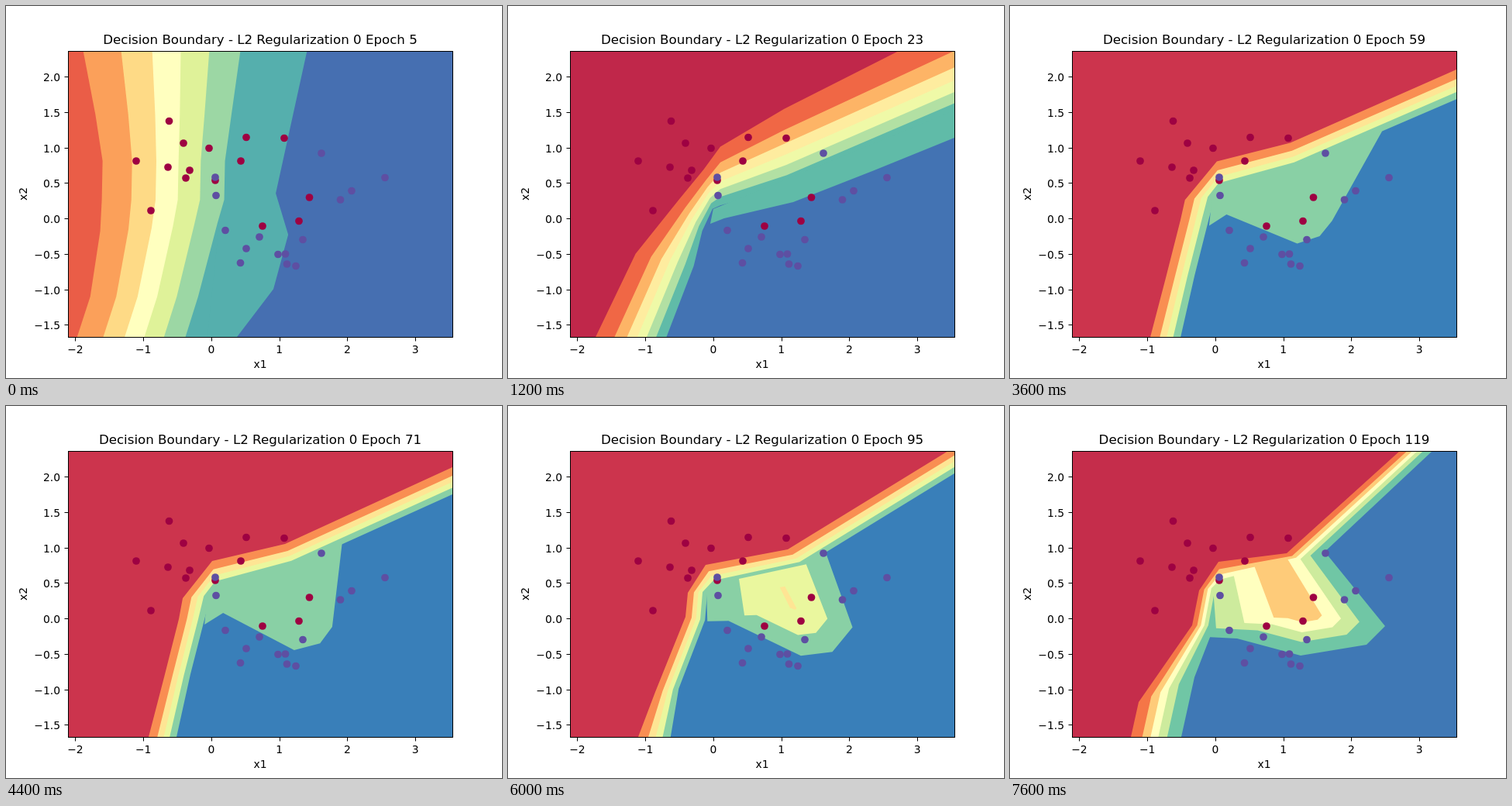
Write an HTML page with a canvas that moves like this. It is 640 px wide and 480 px high and loops after 8000 ms.

```html
<!DOCTYPE html>
<html lang="en">
<head>
<meta charset="utf-8">
<title>Decision Boundary</title>
<style>
html, body { margin: 0; width: 100%; height: 100%; overflow: hidden; background: #fff; }
canvas { display: block; }
</style>
</head>
<body>
<canvas id="plot" width="640" height="480"></canvas>
<script>
const ctx = document.getElementById('plot').getContext('2d');
const STEP = 400, STEPS = 20;
const L = 80, T = 58, R = 576, B = 427;
const mix = (a, b, t) => a + (b - a) * t;
const mixLine = (a, b, t) => a.map((p, i) => [mix(p[0], b[i][0], t), mix(p[1], b[i][1], t)]);
const parse = s => s.split(' ').map(p => p.split(',').map(Number));
const logit = p => Math.log(p / (1 - p));
const LOW = logit(.15), HIGH = logit(.9);

// The model is a slope (contours at LOW and HIGH, evenly spaced in logits between them)
// joined with a hollow that starts at probability `from` on a short spine and is full size at HIGH.
const key = (at, ease, from, low, high, hollow, spine) =>
  ({ at, ease, from: logit(from), parts: [low, high, hollow, spine].map(parse) });
const keys = [
  key(0, 1, .7,
    '70,427 87,375 98,292 99,250 100,200 88,140 68,58',
    '316,427 332,375 364,275 377,250 378,200 397,140 425,58',
    '270,-50 190,554 264,556 360,430 398,290 366,184 450,-50',
    '330,150 330,300'),
  key(3, .7, .6,
    '127,427 176,322 225,256 254,219 274,193 357,148 545,58',
    '245,427 273,342 264,308 269,284 274,291 362,277 892,58',
    '88,349 77,376 128,356 383,296 680,179 978,58 1390,-185',
    '360,215 360,230'),
  key(6, .5, .6,
    '171,427 191,352 210,278 218,258 270,202 368,171 661,58',
    '240,427 258,352 278,268 286,243 264,266 356,239 843,58',
    '168,276 166,333 201,308 383,310 411,288 446,257 931,9',
    '360,215 350,245'),
  key(11, 1.5, .6,
    '184,427 204,350 223,275 228,248 266,200 360,178 622,58',
    '234,427 251,345 269,275 278,243 273,248 375,218 730,58',
    '165,235 143,303 192,272 379,370 447,352 479,309 516,133',
    '355,215 365,262'),
  key(15, 1, .445,
    '168,427 190,369 229,272 232,241 255,205 361,185 568,58',
    '226,427 232,363 264,278 267,239 273,242 389,215 645,58',
    '198,202 193,288 236,287 383,358 447,350 488,300 437,150',
    '355,235 369,260'),
  key(19, 1, .355,
    '156,427 166,382 235,283 244,238 269,201 357,190 503,58',
    '221,427 238,350 264,283 273,233 273,243 388,205 545,58',
    '225,222 215,296 293,300 375,322 460,308 484,284 398,178',
    '338,190 378,266')
];
const basin = parse('430,300 452,324 545,427');

const reds = parse('168,200 210.5,148.5 229,177 209,208 237,212 232,222 187,264 262,183.5 310,169.5 303,200 359,170.5 270,225 391.5,247 378,277.5 331,284');
const blues = parse('270,221 271,244.5 283,289.5 310,313 302.5,331.5 327,298 351,320.5 360.5,320 362.5,333 374,335.5 383,301.5 407,190 431.5,250 446,238.5 489,221.5');

const spectral = ['9e0142', 'd53e4f', 'f46d43', 'fdae61', 'fee08b', 'ffffbf', 'e6f598', 'abdda4', '66c2a5', '3288bd', '5e4fa2']
  .map(h => [0, 2, 4].map(i => parseInt(h.slice(i, i + 2), 16)));

function bandColor(i, bands) {
  const p = (i + .5) / bands * 10, n = Math.floor(p);
  return `rgb(${spectral[n].map((c, j) => Math.round(mix(c, spectral[n + 1][j], p - n)))})`;
}

function fillPath(pts) {
  ctx.beginPath();
  for (const p of pts) ctx.lineTo(p[0], p[1]);
  ctx.fill();
}

function modelAt(n) {
  let i = keys.length - 2;
  while (keys[i].at > n) i--;
  const a = keys[i], b = keys[i + 1];
  const s = ((n - a.at) / (b.at - a.at)) ** a.ease;
  return [mix(a.from, b.from, s), ...a.parts.map((p, j) => mixLine(p, b.parts[j], s))];
}

function field(n) {
  const [bands, gap] = n < 2 ? [9, .1] : n < 4 ? [8, .1] : n < 16 ? [6, .15] : [7, .15];
  const [from, low, high, hollow, [top, bottom]] = modelAt(n);
  const core = hollow.map((p, i) => i % 6 ? bottom : top);
  ctx.save();
  ctx.beginPath();
  ctx.rect(L, T, R - L, B - T);
  ctx.clip();
  ctx.fillStyle = bandColor(bands - 1, bands);
  ctx.fillRect(L, T, R - L, B - T);
  for (let j = bands - 1; j > 0; j--) {
    const z = logit(j * gap);
    ctx.fillStyle = bandColor(j - 1, bands);
    fillPath([...mixLine(low, high, (z - LOW) / (HIGH - LOW)), [-99, T], [-99, B]]);
    const size = Math.max(0, (z - from) / (HIGH - from)) ** .75;
    if (size) fillPath(mixLine(core, hollow, size));
    // The lower plain passes the top level from right to left.
    if (j * gap > .85) fillPath([[-99, 300], ...basin.map(([x, y]) => [x + (17 - n) * 170, y]), [-99, B]]);
  }
  ctx.restore();
}

function dots(pts, color) {
  ctx.fillStyle = color;
  for (const [x, y] of pts) {
    ctx.beginPath();
    ctx.arc(x, y, 4.86, 0, 7);
    ctx.fill();
  }
}

function text(s, x, y, align = 'center', size = 13.89) {
  ctx.font = `${size}px "DejaVu Sans", sans-serif`;
  ctx.textAlign = align;
  ctx.fillText(s, x, y);
}

function axes(n) {
  ctx.fillStyle = ctx.strokeStyle = '#000';
  ctx.lineWidth = 1;
  ctx.strokeRect(L + .5, T + .5, R - L, B - T);
  for (let v = -2; v <= 3; v++) {
    const x = 264.9 + 87.75 * v;
    ctx.fillRect(Math.round(x), B, 1, 5.5);
    text(String(v).replace('-', '\u2212'), x, 448);
  }
  for (let v = -1.5; v <= 2; v += .5) {
    const y = Math.round(274.1 - 91.4 * v);
    ctx.fillRect(L - 4.5, y, 5, 1);
    text(v.toFixed(1).replace('-', '\u2212'), 70, y + 6, 'right');
  }
  text('x1', 328, 467);
  ctx.save();
  ctx.translate(27, 242.5);
  ctx.rotate(-Math.PI / 2);
  text('x2', 0, 0);
  ctx.restore();
  text(`Decision Boundary - L2 Regularization 0 Epoch ${5 + 6 * n}`, 328, 49, 'center', 16.67);
}

let shown = -1;
function tick(now) {
  const n = Math.floor(now / STEP) % STEPS;
  if (n !== shown) {
    shown = n;
    ctx.fillStyle = '#fff';
    ctx.fillRect(0, 0, 640, 480);
    field(n);
    dots(reds, '#9e0142');
    dots(blues, '#5e4fa2');
    axes(n);
  }
  requestAnimationFrame(tick);
}
requestAnimationFrame(tick);
</script>
</body>
</html>
```
